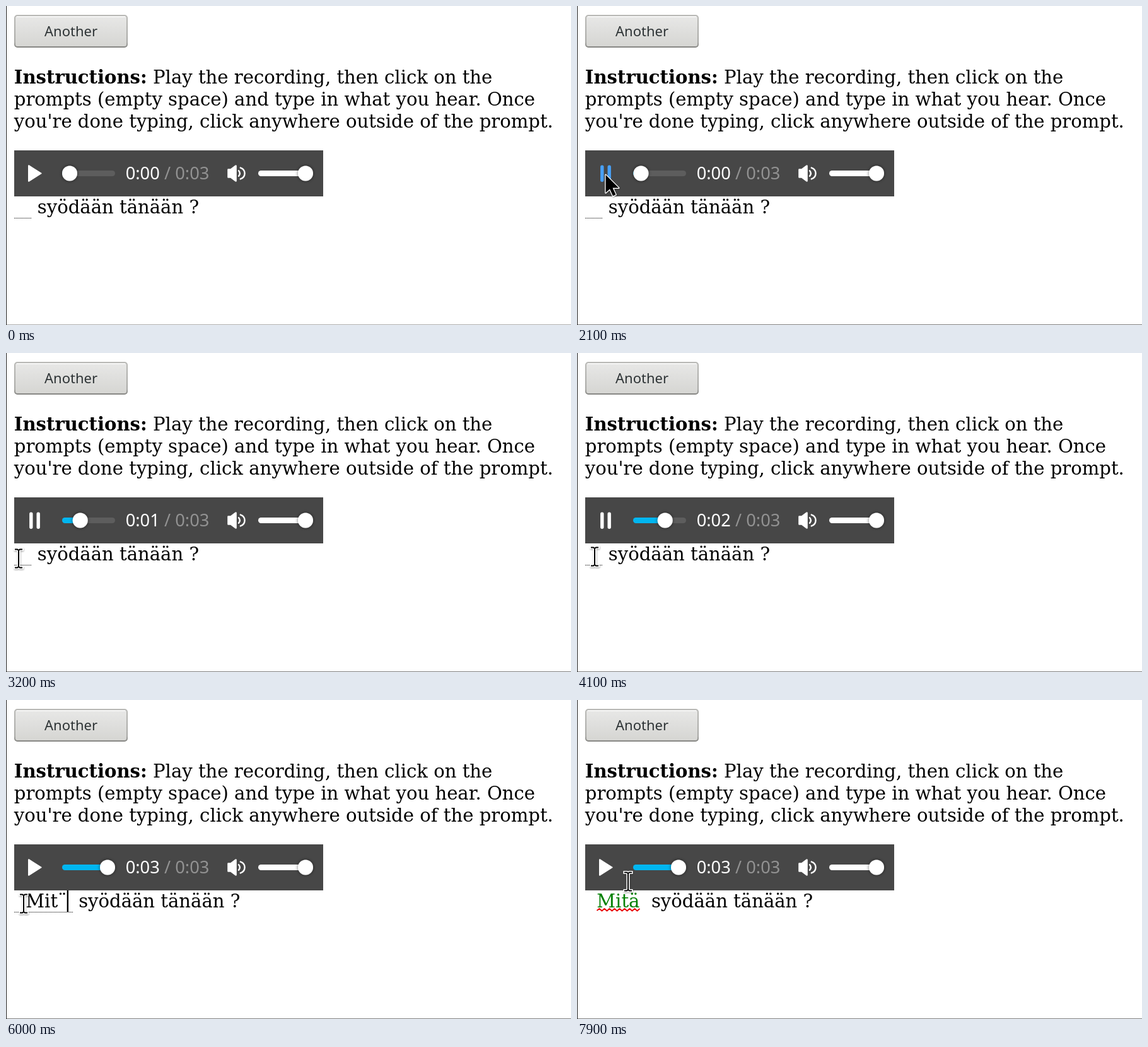
An HTML page that plays this animation: 896x506 px, repeating every 8000 ms.

```html
<!DOCTYPE html>
<html lang="en">
<head>
<meta charset="utf-8">
<title>Listening exercise</title>
<style>
html, body { margin: 0; width: 100%; height: 100%; overflow: hidden; background: #fff; }
svg { display: block; width: 896px; height: 506px; }
.serif { font: 29.1px "DejaVu Serif", serif; white-space: pre; }
.sans { font-family: "Noto Sans", sans-serif; white-space: pre; }
.bold { font-weight: bold; }
</style>
</head>
<body>
<svg viewBox="0 0 896 506">
  <defs>
    <linearGradient id="face" x2="0" y2="1">
      <stop offset="0" stop-color="#e8e8e7"/>
      <stop offset="1" stop-color="#d5d5d2"/>
    </linearGradient>
    <linearGradient id="edge" x2="0" y2="1">
      <stop offset="0" stop-color="#b8b8b5"/>
      <stop offset=".85" stop-color="#a9a9a6"/>
      <stop offset="1" stop-color="#868683"/>
    </linearGradient>
    <filter id="glow" x="-50%" y="-50%" width="200%" height="200%">
      <feDropShadow dx="0" dy="0" stdDeviation="2.6" flood-color="#000" flood-opacity=".6"/>
    </filter>
    <filter id="soft" x="-50%" y="-50%" width="200%" height="200%">
      <feDropShadow dx="0.5" dy="1" stdDeviation="1" flood-color="#000" flood-opacity=".4"/>
    </filter>
    <clipPath id="bar"><rect x="13" y="229" width="490" height="73"/></clipPath>
  </defs>

  <rect width="896" height="506" fill="#fff"/>
  <rect width="1" height="506" fill="#222"/>
  <rect id="base" x="1" y="505" width="895" height="1"/>

  <rect x="14" y="15" width="178" height="50" rx="4" fill="url(#face)" stroke="url(#edge)" stroke-width="2"/>
  <path d="M17 17H189" stroke="#f6f6f5" stroke-width="2"/>
  <text class="sans" x="103" y="48" font-size="22" text-anchor="middle" fill="#2e3436">Another</text>

  <text class="serif" x="12.8" y="123"><tspan class="bold">Instructions:</tspan> Play the recording, then click on the</text>
  <text class="serif" x="12.8" y="158">prompts (empty space) and type in what you hear. Once</text>
  <text class="serif" x="12.8" y="193">you're done typing, click anywhere outside of the prompt.</text>

  <g clip-path="url(#bar)">
    <rect x="13" y="229" width="490" height="73" fill="#474747"/>
    <path id="play" d="M36 253.2L55.6 265.5L36 277.8Z" stroke-width="2" stroke-linejoin="round"/>
    <path id="pause" d="M39.8 255.3V276.2M51.2 255.3V276.2" stroke-width="5.4" stroke-linecap="round"/>
    <rect x="89" y="261" width="84" height="9" rx="4.5" fill="#5d5d5d"/>
    <rect id="fill" x="89" y="261" height="9" rx="4.5" fill="#00b6f0"/>
    <circle id="thumb" cy="265.5" r="12" fill="#fff" filter="url(#glow)"/>
    <text class="sans" x="189.7" y="275" font-size="27.3" fill="#fff"><tspan id="clock"></tspan><tspan fill="#929292"> / 0:03</tspan></text>
    <path d="M352.5 259.5H356.5L364.5 253.5V277.5L356.5 271.5H352.5Z" fill="#fff" stroke="#fff" stroke-width="2.6" stroke-linejoin="round"/>
    <path d="M369 261.2Q372.6 265.5 369 269.8M371.8 256.6C380.8 259.5 380.8 271.5 371.8 274.4" fill="none" stroke="#fff" stroke-width="2.4" stroke-linecap="round"/>
    <rect x="400" y="261" width="84" height="9" rx="4.5" fill="#fff"/>
    <circle cx="475" cy="265.5" r="12" fill="#fff" filter="url(#glow)"/>
  </g>

  <text class="serif" x="12.8" y="329">&#160;&#160;<tspan id="typed"></tspan>&#160; syödään tänään ?</text>
  <path id="dots" stroke="#000" stroke-dasharray="1 1" shape-rendering="crispEdges"/>
  <path id="wave" fill="none" stroke="#e80000" stroke-width="1.8" stroke-linejoin="round"/>
  <rect id="caret" y="302" width="2.4" height="34"/>

  <g id="arrow" filter="url(#soft)">
    <path d="M1.5 2.5V31L8 25L13 36L17.5 34L12.5 23.3H22.2Z" fill="#000" stroke="#fff" stroke-width="2.6" stroke-linejoin="round" paint-order="stroke" transform="translate(0 .3)"/>
  </g>
  <g id="beam" fill="none" filter="url(#soft)" stroke-linecap="square">
    <path d="M-5 -14.5H-2L0 -13L2 -14.5H5M-5 14.5H-2L0 13L2 14.5H5M0 -13V13" stroke="#fff" stroke-width="5"/>
    <path d="M-5 -14.5H-2L0 -13L2 -14.5H5M-5 14.5H-2L0 13L2 14.5H5M0 -13V13" stroke="#000" stroke-width="2"/>
  </g>
</svg>
<script>
const LOOP = 8000, LEFT = 13, SPACE = 9.25;
const $ = Object.fromEntries([...document.querySelectorAll('svg [id]')].map(e => [e.id, e]));

// [time, x, y, kind]; each pose holds until the next
const pointer = [
  [0, 0, 0, ''],
  [300, 247, -8, 'arrow'], [400, 205, 70, 'arrow'], [500, 150, 150, 'arrow'],
  [600, 97, 212, 'arrow'], [700, 62, 250, 'arrow'], [800, 47, 263, 'arrow'],
  [900, 45, 265, 'arrow'], [1100, 44, 266, 'arrow'], [1700, 44, 265, 'arrow'],
  [2300, 43, 271, 'arrow'], [2400, 41, 278, 'arrow'],
  [2800, 38, 286, 'arrow'], [2900, 31, 303, 'arrow'], [3000, 23, 324, 'beam'],
  [3100, 20, 334, 'beam'], [3200, 20, 326, 'beam'], [3300, 25, 324, 'beam'],
  [3400, 28, 323, 'beam'], [6900, 29, 326, 'beam'], [7000, 37, 347, 'arrow'],
  [7100, 55, 376, 'arrow'], [7200, 71, 397, 'arrow'], [7300, 79, 405, 'arrow'],
  [7900, 81, 288, 'beam']
];
const typing = [[0, ''], [5300, 'M'], [5600, 'Mit'], [5900, 'Mit¨'], [6300, 'Mitä']];
const ticks = [2400, 2800, 3100, 3400, 3600, 3900, 4100, 4400, 4700, 5000];
const PLAY = 1900, END = 5400, FOCUS = 4700, BLUR = 7300;

const at = (list, t) => list.findLast(step => step[0] <= t);
const show = (el, on) => el.setAttribute('visibility', on ? 'visible' : 'hidden');

function set(el, attrs) {
  for (const k in attrs) el.setAttribute(k, attrs[k]);
}

function thumbX(t) {
  if (t >= END) return 161;
  const n = ticks.filter(k => k <= t).length;
  return n ? 101.2 + 5.5 * n : t < 2100 ? 101 : 101.5;
}

function zigzag(x, width) {
  let d = `M${x} 334`;
  for (let i = 1; i * 4 <= width; i++) d += `L${x + i * 4} ${i % 2 ? 331 : 334.5}`;
  return d;
}

function drawPlayer(t, hover) {
  const x = thumbX(t), color = hover ? '#48a0f7' : '#fff';
  const playing = t >= PLAY && t < END;
  set($.play, { fill: color, stroke: color });
  set($.pause, { stroke: color });
  show($.play, !playing);
  show($.pause, playing);
  set($.thumb, { cx: x });
  set($.fill, { width: x - 89 });
  $.clock.textContent = '0:0' + Math.round((x - 101) / 19.5);
}

function drawPrompt(t) {
  const text = at(typing, t)[1], done = t >= BLUR;
  $.typed.textContent = text;
  set($.typed, { fill: done ? '#008000' : '#000' });
  const width = text ? $.typed.getComputedTextLength() : 0;
  const x = LEFT + 2 * SPACE;
  set($.caret, { x: x + width - 0.2 });
  set($.dots, { d: `M${LEFT} 336.5H${Math.round(x + width + SPACE - 0.5)}` });
  set($.wave, { d: zigzag(x, width) });
  show($.caret, t >= FOCUS && !done);
  show($.dots, !done);
  show($.wave, done);
}

function draw(t) {
  const [, x, y, kind] = at(pointer, t);
  for (const name of ['arrow', 'beam']) {
    show($[name], kind === name);
    set($[name], { transform: `translate(${x} ${y})` });
  }
  set($.base, { fill: t < 2000 ? '#adadad' : '#808080' });
  drawPlayer(t, kind === 'arrow' && x < 78 && y > 229 && y < 302);
  drawPrompt(t);
}

const start = performance.now();
function frame() {
  draw((performance.now() - start) % LOOP);
  requestAnimationFrame(frame);
}
frame();
</script>
</body>
</html>
```
